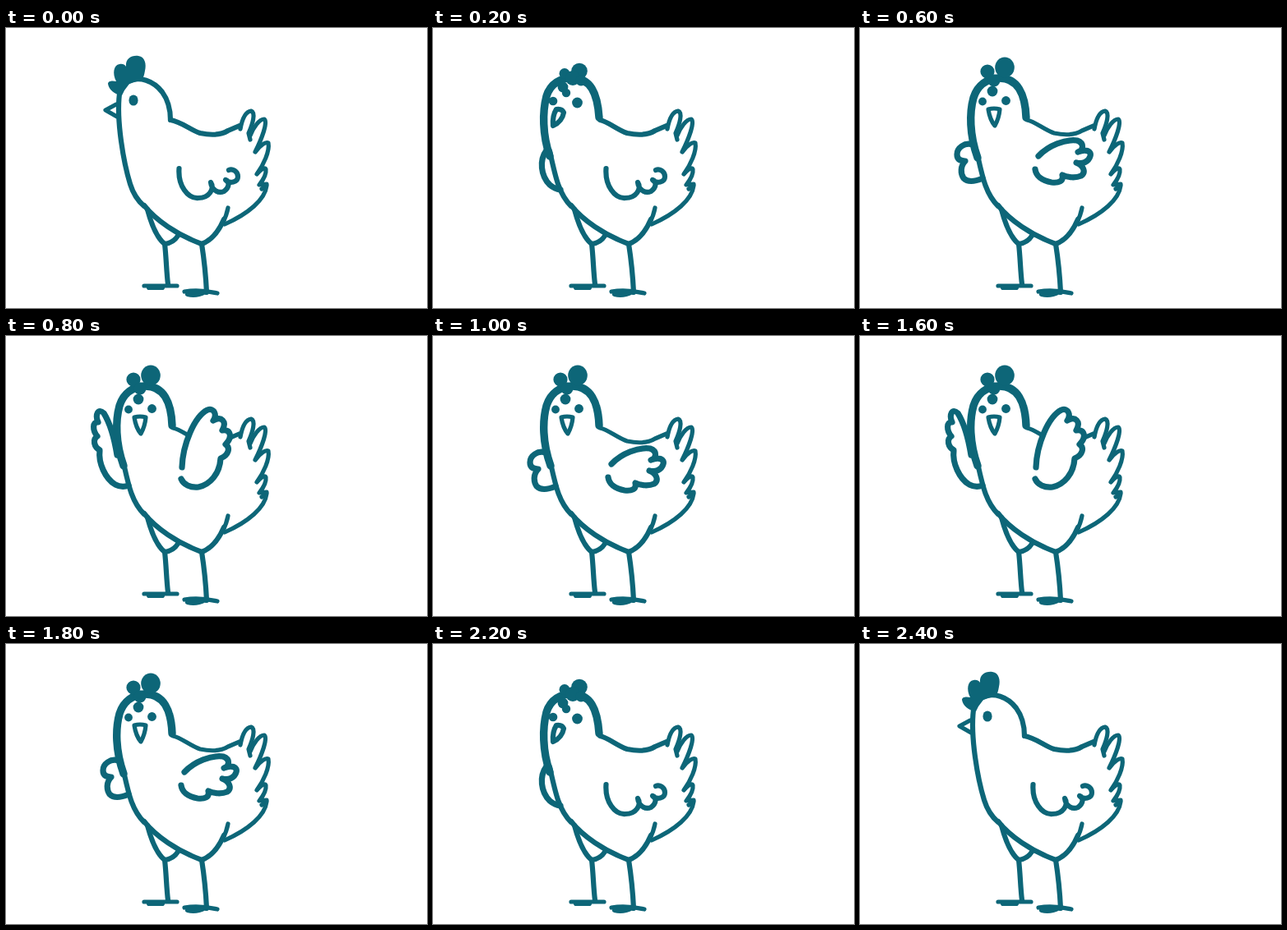
Animation of 512 by 341 pixels, one loop 2.6 s. Source, as an HTML page:

```html
<!DOCTYPE html>
<html lang="en">
<head>
<meta charset="utf-8">
<title>Flapping hen</title>
<style>
  html, body { margin: 0; width: 100%; height: 100%; overflow: hidden; background: #fff; }
  svg { display: block; width: 100%; height: 100%; }
  .ink { fill: none; stroke: #0d6678; stroke-width: 6.2; stroke-linecap: round; stroke-linejoin: round; }
  .solid { fill: #0d6678; stroke: none; }
  .thin { stroke-width: 5.2; }
  .wing { stroke-width: 7.2; }
  .bold { stroke-width: 9.4; }
  .mask { fill: #fff; stroke: none; }

  /* thirteen poses of 200 ms, hard cuts */
  .pose { animation: 2600ms step-end infinite; }
  .side  { animation-name: side; }
  .turn  { animation-name: turn; }
  .front { animation-name: front; }
  .fold  { animation-name: fold; }
  .tuck  { animation-name: tuck; }
  .half  { animation-name: half; }
  .high  { animation-name: high; }

  @keyframes side {
    0%, 92.307%, 100% { visibility: visible; }
    7.692% { visibility: hidden; }
  }
  @keyframes turn {
    0%, 15.384%, 92.307%, 100% { visibility: hidden; }
    7.692%, 84.615% { visibility: visible; }
  }
  @keyframes front {
    0%, 84.615%, 100% { visibility: hidden; }
    15.384% { visibility: visible; }
  }
  @keyframes fold {
    0%, 46.153%, 76.923%, 100% { visibility: visible; }
    23.076%, 53.846% { visibility: hidden; }
  }
  @keyframes tuck {
    0%, 23.076%, 53.846%, 92.307%, 100% { visibility: hidden; }
    7.692%, 46.153%, 76.923% { visibility: visible; }
  }
  @keyframes half {
    0%, 30.769%, 46.153%, 61.538%, 76.923%, 100% { visibility: hidden; }
    23.076%, 38.461%, 53.846%, 69.23% { visibility: visible; }
  }
  @keyframes high {
    0%, 38.461%, 69.23%, 100% { visibility: hidden; }
    30.769%, 61.538% { visibility: visible; }
  }
</style>
</head>
<body>
<svg viewBox="0 0 512 341" class="ink">
  <!-- tail and rump -->
  <g class="thin">
    <path d="M285 123C287 112 291 102 298 101C304 103 300 117 295 128L297 136"/>
    <path d="M297 131C301 121 308 111 314 111C319 114 311 135 303 151"/>
    <path d="M304 150C309 143 316 138 319 140C321 150 313 167 305 178"/>
    <path d="M306 177C310 172 315 169 316 172C317 179 312 186 308 191L317 190"/>
    <path d="M311 196L317 192C315 209 295 226 266 239"/>
  </g>

  <!-- belly, thighs and legs -->
  <path d="M168 216C182 234 208 252 238 263C254 257 262 240 265 233"/>
  <path class="thin" d="M263 238C267 231 269 225 270 219"/>
  <path d="M172 221C177 240 184 256 193 263C202 262 206 258 209 253"/>
  <path d="M193 263C195 280 195 296 197 312M238 263C241 282 243 302 244 322"/>
  <path class="thin" d="M168 314L208 314M217 321Q235 318 257 323"/>
  <path d="M174 316L190 316M221 324Q231 327 242 321"/>

  <!-- head in profile -->
  <g class="pose side">
    <path d="M138 80C134 113 143 164 151 190C155 203 161 211 168 217"/>
    <path d="M147 66C162 57 180 65 190 78C198 89 200 101 200 112"/>
    <path d="M200 112C213 114 224 124 236 128C250 131 262 130 270 125L284 119"/>
    <path class="thin" d="M134 93L121 100L135 108"/>
    <path class="solid" d="M141 82C132 81 125 75 124 68C124 64 130 64 134 65C129 55 131 45 138 44C142 43 145 45 146 47C145 37 153 33 161 34C169 35 171 44 169 52C168 58 167 61 165 63L150 68L144 76Z"/>
    <ellipse class="solid" cx="155" cy="88" rx="5.6" ry="6.6"/>
  </g>

  <!-- head turning -->
  <g class="pose turn">
    <path class="bold" d="M142 156C133 130 133 102 138 83C143 67 156 61 168 61C192 60 200 80 202 109"/>
    <path d="M142 150C149 182 153 202 168 217"/>
    <path d="M203 112C213 114 224 124 236 128C250 131 262 130 270 125L284 119"/>
    <g class="solid">
      <circle cx="178" cy="52.500" r="9.8"/>
      <circle cx="160" cy="55.500" r="6.5"/>
      <circle cx="170" cy="61" r="9"/>
      <circle cx="180" cy="64" r="6.5"/>
      <circle cx="158" cy="72" r="6.4"/>
      <circle cx="162" cy="79" r="5.2"/>
      <circle cx="175.500" cy="91" r="6.4"/>
      <circle cx="146" cy="89" r="5.3"/>
    </g>
    <path d="M150 99Q157 98 159 103Q157 114 146 119Q145 107 150 99Z"/>
  </g>

  <!-- head facing forward -->
  <g class="pose front">
    <path class="bold" d="M143 158C133 130 133 103 138 85C143 69 155 62 168 61C192 60 201 81 202 109"/>
    <path d="M143 155C149 182 153 202 168 217"/>
    <path class="thin" d="M203 112C213 114 224 124 236 128C250 131 262 130 270 125L284 119"/>
    <g class="solid">
      <ellipse cx="176" cy="48" rx="11.8" ry="12.5"/>
      <circle cx="155" cy="53" r="8.6"/>
      <circle cx="163" cy="64" r="7.4"/>
      <circle cx="161" cy="77" r="6.4"/>
      <circle cx="149" cy="89.500" r="4.9"/>
      <circle cx="177.500" cy="88.500" r="5.4"/>
    </g>
    <path class="thin" d="M156 99Q163 97 170 99Q169 110 164 119Q158 112 156 99Z"/>
  </g>

  <!-- wings at rest -->
  <path class="pose fold" d="M210.500 171C209 192 221 208 234 207C247 207 254 196 249 188C250 197 258 202 265 199C272 194 272 187 267 185C272 190 282 188 282 181C282 174 275 171 271 173"/>
  <path class="pose tuck wing" d="M138 149C129 161 131 180 142 191Q148 196 155 197"/>

  <!-- wings half raised -->
  <g class="pose half wing">
    <path d="M217 156C229 143 250 135 264 137C273 140 272 149 265 151C275 147 282 150 280 156C278 163 271 166 263 164C272 167 275 176 269 180C262 183 252 182 246 179C248 187 241 189 233 188C221 186 214 180 213 172"/>
    <path d="M137 142C127 139 118 146 118 154C118 160 122 162 128 162C122 168 122 177 126 183Q133 190 149 183"/>
  </g>

  <!-- wings fully raised -->
  <g class="pose high wing">
    <path class="mask" d="M214 160C216 130 230 98 247 90L272 115L262 160L235 184Z"/>
    <path d="M214 160C215 132 229 98 245 90C253 87 257 96 252 103C262 97 269 104 263 115C273 113 276 123 267 132C273 136 271 145 261 149C260 168 248 181 234 184C224 185 216 181 213 174"/>
    <path d="M135 145C132 126 127 107 119 94C112 87 108 96 112 105C105 104 105 115 111 122C105 126 107 135 114 139C112 155 121 174 133 181Q141 185 149 182"/>
  </g>
</svg>
</body>
</html>
```
